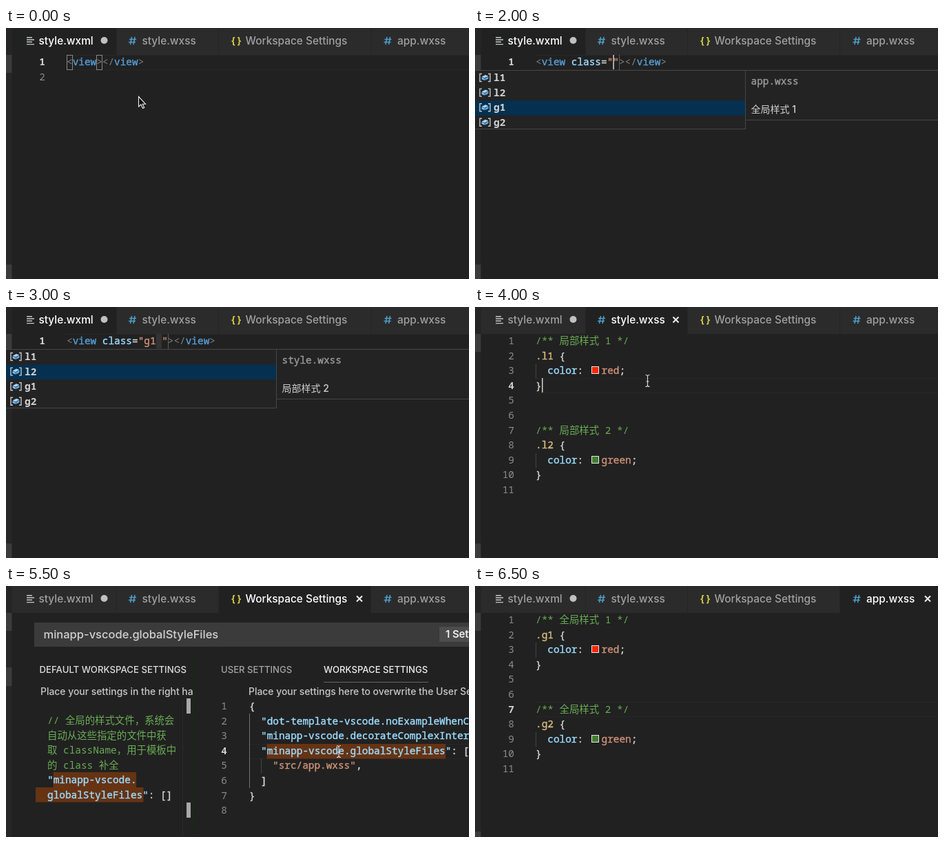
Write an HTML page that moves like this. It is 672 px wide and 364 px high and loops after 7 s.

```html
<!DOCTYPE html>
<html lang="en">
<head>
<meta charset="utf-8">
<title>Style class completion</title>
<style>
  html, body { margin: 0; width: 100%; height: 100%; overflow: hidden; background: #212121; }
  svg { display: block; width: 672px; height: 364px; }
  text { white-space: pre; }
  .ui { font-family: Inter, "Noto Sans CJK SC", "Noto Sans CJK", sans-serif; }
  .mono { font: 500 14.4px "Noto Sans Mono", "Noto Sans CJK SC", "Noto Sans CJK", monospace; stroke-width: .4px; }
  .bold { font-weight: 700; }
  .scene { visibility: hidden; animation: show 7s step-end infinite; }
  @keyframes show {
    0% { visibility: visible; }
    7.142857%, 100% { visibility: hidden; }
  }
</style>
</head>
<body>
<svg id="stage" viewBox="0 0 672 364"></svg>
<script>
const CHAR = 8.64, LINE = 21.6, LEFT = 88;
const color = {
  dim: '#808080', tag: '#569cd6', attr: '#9cdcfe', plain: '#d4d4d4',
  string: '#ce9178', comment: '#69ac55', selector: '#d7ba7d', find: '#663313'
};

const rect = (x, y, w, h, fill, extra = '') =>
  `<rect x="${x}" y="${y}" width="${w}" height="${h}" fill="${fill}" ${extra}/>`;
const frame = (x, y, w, h, stroke, fill = 'none') =>
  rect(x + .5, y + .5, w - 1, h - 1, fill, `stroke="${stroke}"`);
const path = (d, stroke, width = 1, fill = 'none') =>
  `<path d="${d}" fill="${fill}" stroke="${stroke}" stroke-width="${width}"/>`;
const ui = (x, y, size, fill, str, weight = 500) =>
  `<text class="ui" x="${x}" y="${y}" font-size="${size}" font-weight="${weight}" fill="${fill}">${str}</text>`;
const mono = (x, y, content, fill = color.plain, cls = '', anchor = 'start') =>
  `<text class="mono ${cls}" x="${x}" y="${y}" fill="${fill}" text-anchor="${anchor}">${content}</text>`;
const escapeText = s => s.replace(/&/g, '&amp;').replace(/</g, '&lt;');

// Takes alternating color names and strings; a thin stroke gives the code its medium weight.
const code = (...parts) => {
  let out = '';
  for (let i = 0; i < parts.length; i += 2) {
    const fill = color[parts[i]];
    const stroke = ['comment', 'dim'].includes(parts[i]) ? 'none' : fill;
    out += `<tspan fill="${fill}" stroke="${stroke}">${escapeText(parts[i + 1])}</tspan>`;
  }
  return out;
};

const lineNumbers = (x, y, count, active) =>
  Array.from({ length: count }, (_, i) => {
    const on = i + 1 === active;
    return mono(x, y + i * LINE, i + 1, on ? '#d0d0d0' : '#8c8c8c', on ? 'bold' : '', 'end');
  }).join('');
const currentLine = (x, y) => path(`M${x} ${y + .5}H672M${x} ${y + 21.5}H672`, '#282828');
const caret = (x, y) => rect(x, y, 1.5, 21, '#d8d0c4');
const ibeam = (x, y) =>
  path(`M${x - 3} ${y - 8.5}q3 0 3 2v13q0 2 -3 2M${x + 3} ${y - 8.5}q-3 0 -3 2v13q0 2 3 2M${x - 2} ${y + 1}h4`, '#ddd', 1.1);
const arrow = (x, y) =>
  path(`M${x} ${y}v14.5l3.4 -3l2.6 5.5l2.2 -1l-2.5 -5.3h4.3z`, '#eee', 1.1, '#111');

const tabs = [
  { x: 9, end: 160, icon: 'lines', label: 'style.wxml', at: 47.5 },
  { x: 161, end: 308, icon: '#', label: 'style.wxss', at: 197.5, close: 291.5 },
  { x: 309, end: 529, icon: '{}', label: 'Workspace Settings', at: 347.5, close: 513 },
  { x: 530, end: 672, icon: '#', label: 'app.wxss', at: 568, close: 657 }
];

function tabBar(active) {
  let out = rect(0, 0, 672, 39, '#252525');
  tabs.forEach((tab, i) => {
    const on = i === active;
    out += rect(tab.x, 0, tab.end - tab.x, 39, on ? '#212121' : '#2b2b2b');
    out += ui(tab.at, 24, 15.4, on ? '#fff' : '#a0a0a0', tab.label);
    if (tab.icon === 'lines')
      out += path('M30 13.7h8M30 17h11M30 20.3h8M30 23.6h11', '#c4c8c8', 1.4);
    else if (tab.icon === '#')
      out += path(`M${tab.at - 15} 13l-2 11M${tab.at - 10.5} 13l-2 11M${tab.at - 18.5} 16.5h10M${tab.at - 19.5} 20.5h10`, '#4f9fca', 1.5);
    else
      out += mono(325.5, 23, '{}', '#d6cf45', 'bold');
    if (on && tab.close)
      out += path(`M${tab.close - 4} 14.5l8 8m0 -8l-8 8`, '#eee', 2);
  });
  return out + '<circle cx="142.5" cy="18" r="5" fill="#c0c0c0"/>';
}

function edge(marks) {
  return rect(0, 39, 8.5, 325, '#272727') +
    marks.map(([y, h]) => rect(0, y, 8.5, h, '#3b3b3b')).join('');
}

const sideMarks = [[39, 26], [343, 21]];

function cube(x, y, scale) {
  return `<g transform="translate(${x} ${y}) scale(${scale})">
    <path d="M-8.5 -2L1 -7L8.5 -4L-1 1Z" fill="#a5d6ff"/>
    <path d="M-8.5 -1L-1 2V7L-8.5 4Z" fill="#75beff"/>
    <path d="M0 2L8.5 -2.7V2.5L0 7Z" fill="#62aeea"/></g>`;
}

function popup(rows, selected, bracketed) {
  const bottom = rows.length > 2 ? 147 : 104;
  let out = frame(-1, 61, 394, bottom - 61, '#454545', '#232324');
  rows.forEach((row, i) => {
    const y = 72 + i * LINE;
    if (i === selected) out += rect(0, y - 10, 392, 21.5, '#05304f');
    out += cube(14.5, y, bracketed ? .58 : 1);
    if (bracketed)
      out += path(`M10 ${y - 5.5}h-3v11h3M19 ${y - 5.5}h3v11h-3`, '#c5c5c5', 1.4);
    out += mono(27, y + 5, row, color.plain, 'bold');
  });
  return out;
}

const docBox = height => frame(392, 61, 282, height, '#454545', '#232324');

function attributePopup() {
  const hit = '<tspan fill="#50a5e4">cla</tspan>ss';
  return popup([hit, 'hover-' + hit], 0, false) +
    docBox(33) + ui(400, 83, 13.9, '#d0d0d0', 'class');
}

function classPopup(selected) {
  const local = selected < 2;
  return popup(['l1', 'l2', 'g1', 'g2'], selected, true) + docBox(73) +
    mono(400.5, 82, local ? 'style.wxss' : 'app.wxss', '#9a9a9a', '" stroke="#9a9a9a') +
    ui(400.5, 123, 14, '#d0d0d0', `${local ? '局部' : '全局'}样式 ${selected % 2 + 1}`);
}

// The markup line: attribute name, optional class value, and layers below and above the text.
function markup({ attr = '', value, under = '', over = '' }) {
  const inner = value === undefined
    ? ['attr', attr]
    : ['attr', attr, 'plain', '=', 'string', `"${value}"`];
  return tabBar(0) + edge(sideMarks) + currentLine(88, 39) +
    lineNumbers(57, 54, 2, 1) + under +
    mono(LEFT, 54, code('dim', '<', 'tag', 'view', ...inner, 'dim', '></', 'tag', 'view', 'dim', '>')) + over;
}

const column = n => LEFT + n * CHAR;
const bracketPair = n =>
  [0, n].map(c => frame(Math.round(column(c)), 39, 9, 22, '#888')).join('');
const tabStop = n => rect(Math.round(column(n)), 39, 1, 22, '#5c5c5c');

function stylesheet(tab, kind, prefix, active, marks, over = '') {
  let out = tabBar(tab) + edge(marks) + currentLine(88, 38.5 + (active - 1) * LINE) +
    lineNumbers(57, 54, 11, active);
  ['red', 'green'].forEach((name, i) => {
    const y = 54 + i * 6 * LINE, prop = y + 2 * LINE;
    out += mono(LEFT, y, code('comment', `/** ${kind}样式 ${i + 1} */`)) +
      mono(LEFT, y + LINE, code('selector', `.${prefix}${i + 1}`, 'plain', ' {')) +
      rect(88, prop - 15, 1, LINE, '#454545') +
      mono(column(2), prop, code('attr', 'color', 'plain', ':')) +
      frame(169, Math.round(prop - 11), 11, 11, '#e8e8e8', i ? '#437c2e' : '#ff2600') +
      mono(183.5, prop, code('string', name, 'plain', ';')) +
      mono(LEFT, y + 3 * LINE, code('plain', '}'));
  });
  return out + over;
}

function settings() {
  const key = s => ['attr', `"${s}"`, 'plain', ': '];
  const right = [
    [353, 'plain', '{'],
    [370, ...key('dot-template-vscode.noExampleWhenClass'), 'plain', 'true'],
    [370, ...key('minapp-vscode.decorateComplexInterpolation'), 'plain', 'true'],
    [370, ...key('minapp-vscode.globalStyleFiles'), 'plain', '['],
    [387, 'string', '"src/app.wxss"', 'plain', ','],
    [370, 'plain', ']'],
    [353, 'plain', '}']
  ];
  const left = [
    ['comment', '// 全局的样式文件，系统会'],
    ['comment', '自动从这些指定的文件中获'],
    ['comment', '取 className，用于模板中'],
    ['comment', '的 class 补全'],
    ['attr', '"minapp-vscode.'],
    ['attr', 'globalStyleFiles"', 'plain', ': []']
  ];
  return tabBar(2) + edge([[39, 26], [118, 27]]) +
    rect(41, 53, 631, 35, '#3b3b3b') +
    ui(54.5, 76, 16.5, '#d0d0d0', 'minapp-vscode.globalStyleFiles') +
    rect(629, 59, 43, 22, '#4d4d4d') + ui(638, 75, 14.8, '#eee', '1 Setting matched', 600) +
    ui(48.5, 126, 13.2, '#ddd', 'DEFAULT WORKSPACE SETTINGS') +
    ui(312, 126, 13.1, '#a4a4a4', 'USER SETTINGS') +
    ui(461, 126, 13.1, '#eee', 'WORKSPACE SETTINGS') + rect(461, 139, 152, 1, '#666') +
    ui(50, 158, 13.9, '#c8c8c8', 'Place your settings in the right hand') +
    rect(272, 140, 400, 24, '#212121') +
    rect(256, 164, 1, 200, '#2b2b2b') +
    rect(271, 101, 3, 263, '#1c2618') +
    rect(262, 163, 6, 22, '#a8a8a8') + rect(262, 314, 6, 22, '#a8a8a8') +
    ui(352, 158, 13.9, '#c8c8c8', 'Place your settings here to overwrite the User Settings.') +
    currentLine(352, 229) +
    rect(378.6, 229, 259.4, 21.5, color.find) +
    rect(68.6, 270, 120.4, 22, color.find) + rect(43, 292, 156.5, 21.5, color.find) +
    rect(353, 185, 1, 5 * LINE, '#707070') + rect(370, 250, 1, LINE, '#454545') +
    lineNumbers(321, 179, 8, 4) +
    right.map(([x, ...parts], i) => mono(x, 179 + i * LINE, code(...parts))).join('') +
    left.map((parts, i) => mono(60, 200 + i * LINE, code(...parts))).join('') +
    ibeam(483, 240);
}

const localSheet = stylesheet(1, '局部', 'l', 4, sideMarks, caret(97, 103) + ibeam(250.5, 107));
const globalSheet = stylesheet(3, '全局', 'g', 7, [[39, 26], [356, 8]]);
const settingsView = settings();

// One entry per half second.
const scenes = [
  markup({ under: bracketPair(5), over: arrow(192.5, 99.5) }),
  markup({ attr: ' ', under: bracketPair(6), over: caret(column(6), 39) }),
  markup({ attr: ' cla', under: bracketPair(9), over: caret(column(9), 39) + attributePopup() }),
  markup({ attr: ' class', value: '', under: tabStop(14), over: caret(column(13), 39) + classPopup(0) }),
  markup({ attr: ' class', value: '', under: tabStop(14), over: caret(column(13), 39) + classPopup(2) }),
  markup({ attr: ' class', value: 'g1', under: tabStop(16), over: caret(column(15), 39) }),
  markup({ attr: ' class', value: 'g1 ', under: tabStop(17) + rect(218, 39, 8, 21, '#333'), over: classPopup(1) }),
  markup({ attr: ' class', value: 'g1 l2', under: tabStop(19), over: caret(column(18), 39) }),
  localSheet,
  settingsView, settingsView, settingsView,
  globalSheet, globalSheet
];

document.getElementById('stage').innerHTML = rect(0, 0, 672, 364, '#212121') +
  scenes.map((content, i) =>
    `<g class="scene" style="animation-delay:${i * .5 - 7}s">${content}</g>`).join('');
</script>
</body>
</html>
```
